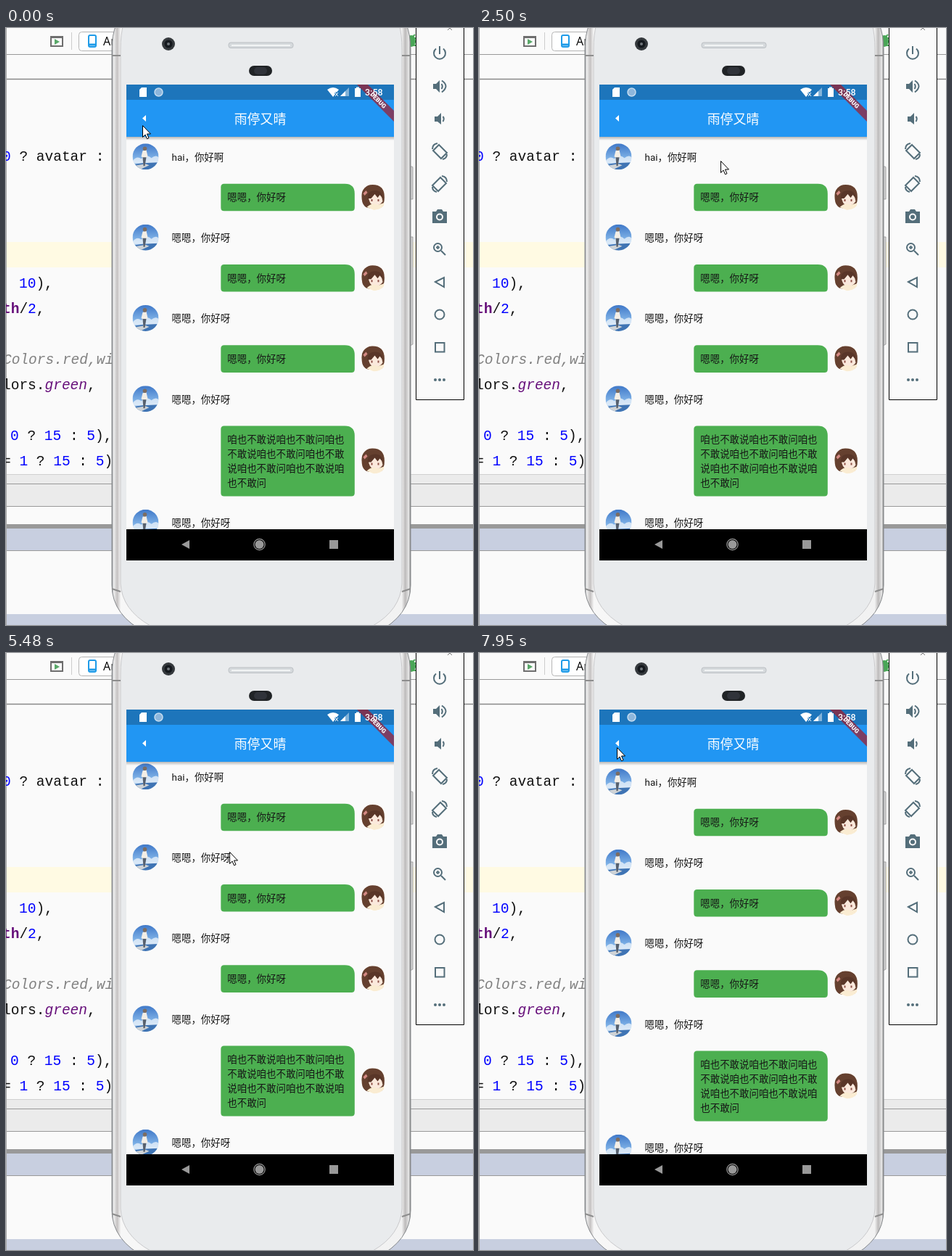
An HTML page that plays this animation: 644x823 px, repeating every 8 s.

```html
<!DOCTYPE html>
<html lang="zh-CN">
<head>
<meta charset="utf-8">
<title>Chat app demo</title>
<style>
html, body { margin: 0; width: 100%; height: 100%; overflow: hidden; background: #fafafa; }
svg { display: block; width: 644px; height: 823px; }
text { white-space: pre; }
.ui { font-family: Roboto, "Noto Sans CJK SC", "Noto Sans CJK", sans-serif; fill: #161616; }
.title { font-size: 17.9px; fill: #fff; text-anchor: middle; }
.msg { font-size: 13.45px; }
.code { font: 19.5px "Liberation Mono", monospace; fill: #111; }
.num { fill: #00f; }
.field { fill: #660e7a; }
.tool { fill: none; stroke: #546e7a; stroke-width: 2; }
.solid { fill: #546e7a; stroke: none; }

#chat { animation: fade 8s infinite, slide 8s infinite; }
#messages { animation: scroll 8s ease-in-out infinite; }
#glow-top { animation: glow-top 8s linear infinite; }
#glow-end { animation: glow-end 8s linear infinite; }
#cursor { animation: point 8s linear infinite; }

/* Page closes, opens at once, closes again and opens with a transition */
@keyframes fade {
  0%, 9.2% { opacity: 1; animation-timing-function: cubic-bezier(0, 0, .58, 1); }
  13.2% { opacity: 0; animation-timing-function: step-end; }
  31.25%, 86.6% { opacity: 1; animation-timing-function: cubic-bezier(0, 0, .58, 1); }
  90.6%, 94.9% { opacity: 0; animation-timing-function: cubic-bezier(.42, 0, 1, 1); }
  98%, 100% { opacity: 1; }
}
@keyframes slide {
  0%, 9.2% { transform: none; animation-timing-function: cubic-bezier(.8, 0, .6, 1); }
  13.2% { transform: translateY(153px); animation-timing-function: step-end; }
  31.25%, 86.6% { transform: none; animation-timing-function: cubic-bezier(.8, 0, .6, 1); }
  90.6%, 94.9% { transform: translateY(153px); animation-timing-function: cubic-bezier(.4, 0, .2, 1); }
  98%, 100% { transform: none; }
}
@keyframes scroll {
  0%, 39% { transform: none; }
  46%, 51% { transform: translateY(-94px); animation-timing-function: linear; }
  56.1%, 57.6% { transform: translateY(-12.5px); }
  59%, 66.5% { transform: none; }
  68.5%, 70% { transform: translateY(-7px); }
  74%, 78.2% { transform: translateY(-94px); }
  80%, 91% { transform: translateY(-90px); animation-timing-function: step-end; }
  92%, 100% { transform: none; }
}
@keyframes glow-end {
  0%, 48% { opacity: 0; }
  51% { opacity: .13; }
  56.1%, 57.6% { opacity: .075; }
  59%, 100% { opacity: 0; }
}
@keyframes glow-top {
  0%, 58% { opacity: 0; }
  60%, 62% { opacity: .1; }
  65%, 100% { opacity: 0; }
}
@keyframes point {
  0%, 1.87% { transform: translate(188px, 134px); }
  1.88%, 5.75% { transform: translate(183px, 130px); }
  9.1% { transform: translate(190px, 130px); }
  11%, 12.5% { transform: translate(210px, 128px); }
  17.75%, 35.8% { transform: translate(333px, 183px); }
  39% { transform: translate(345px, 400px); }
  46%, 51% { transform: translate(334px, 265px); }
  56.1%, 57.6% { transform: translate(336px, 352px); }
  60% { transform: translate(335px, 380px); }
  68.5%, 70% { transform: translate(308px, 274px); }
  76.3%, 78.2% { transform: translate(320px, 207px); }
  80%, 83.2% { transform: translate(322px, 212px); }
  86.6% { transform: translate(190px, 130px); }
  93%, 96.3% { transform: translate(300px, 172px); }
  97.9% { transform: translate(215px, 87px); }
  99.3%, 100% { transform: translate(190px, 130px); }
}
</style>
</head>
<body>
<svg viewBox="0 0 644 823">
  <defs>
    <linearGradient id="sky" x2="0" y2="1">
      <stop offset="0" stop-color="#3f78c8"/><stop offset=".55" stop-color="#7db0e6"/><stop offset="1" stop-color="#dbeaf6"/>
    </linearGradient>
    <linearGradient id="shade" x2="0" y2="1">
      <stop offset="0" stop-opacity=".27"/><stop offset="1" stop-opacity="0"/>
    </linearGradient>
    <linearGradient id="rim">
      <stop offset="0" stop-color="#85898d"/><stop offset=".006" stop-color="#eee"/><stop offset=".018" stop-color="#c5c2c2"/>
      <stop offset=".03" stop-color="#f7f7f7"/><stop offset=".97" stop-color="#f2f2f2"/><stop offset=".982" stop-color="#bdbbbb"/>
      <stop offset=".994" stop-color="#e6e6e6"/><stop offset="1" stop-color="#777"/>
    </linearGradient>
    <clipPath id="disc"><circle r="18"/></clipPath>
    <clipPath id="screen"><path d="M166 78H535V691H166z"/></clipPath>
    <clipPath id="body"><path d="M166 150H535V691H166z"/></clipPath>
    <g id="seaside">
      <path d="M-18-18H18V18H-18z" fill="url(#sky)"/>
      <path d="M-18 6Q-12-2-6 3Q2-4 8 2Q14-3 18 1V9H-18z" fill="#eef5fb" opacity=".75"/>
      <path d="M-18 11L-4 9L18 8V18H-18z" fill="#3f74b4"/>
      <path d="M-18 13L0 10L5 12L-8 18H-18z" fill="#cfd3d6"/>
      <path d="M-4-8L1-9L3 0L0 2L-1 12H-3L-3 2L-6 0z" fill="#f3eee6"/>
      <path d="M-4 1H1L-1 13H-3z" fill="#56606e"/>
      <circle cx="-1" cy="-11" r="2.8" fill="#7c6d62"/>
    </g>
    <g id="girl">
      <path d="M-18-18H18V18H-18z" fill="#fffdf9"/>
      <path d="M-16 8Q-21-17-2-17Q17-17 14 6L11 14Q-8 17-14 13z" fill="#65402f"/>
      <path d="M-8-2Q2-10 10-3L12 6Q7 13 0 12Q-7 10-8-2z" fill="#fbe9dc"/>
      <path d="M-9 2Q-9-10 3-9Q12-8 12 2L8-3L5 1L1-4L-4 2z" fill="#593628"/>
      <path d="M-10 14Q-2 7 5 11L14 8L13 16L0 18z" fill="#faecd2"/>
      <path d="M-15-5L-11-9L-9-6L-13-2z" fill="#d58a84"/>
      <path d="M-3 3V6M6 3V6" stroke="#8e5147" stroke-width="2"/>
    </g>
  </defs>

  <!-- editor window -->
  <path d="M0 0H644V823H0z" fill="#fafafa"/>
  <path d="M0 295H644V330H0z" fill="#fffae3"/>
  <path d="M0 615H644V659H0z" fill="#ebebeb"/>
  <path d="M0 684H644V690H0z" fill="#999"/>
  <path d="M0 690H644V720H0zM0 808H644V823H0z" fill="#c8cfe0"/>
  <path d="M0 36.5H644M0 628.5H644M0 659.5H644M0 720.5H644" stroke="#999"/>
  <path d="M0 70.5H644" stroke="#888" stroke-width="1.6"/>
  <path d="M0 615.5H644" stroke="#d0d0d0"/>
  <path d="M.5 0V823" stroke="#aaa"/>
  <path d="M62 12H78V25H62zM62 13H78" fill="none" stroke="#6e6e6e" stroke-width="2"/>
  <path d="M67 15L74 19L67 23z" fill="#59a869"/>
  <path d="M90.5 6V30" stroke="#ccc"/>
  <rect x="100.5" y="5.5" width="90" height="26" rx="4" fill="#fff" stroke="#b5b5b5"/>
  <rect x="114" y="10" width="10" height="16" rx="2" fill="#fff" stroke="#1e9be8" stroke-width="2"/>
  <path d="M114 23H124" stroke="#1e9be8" stroke-width="3"/>
  <text x="134" y="24" style="font:16px 'Open Sans',sans-serif">An</text>
  <g stroke="#4aa657" stroke-width="2"><ellipse cx="559" cy="18" rx="5" ry="7" fill="#4aa657"/><path d="M551 14H567M551 19H567M552 24H566M554 9L557 12M564 9L561 12"/></g>
  <g class="code">
    <text x="-5" y="183"><tspan class="num">0</tspan> ? avatar :</text>
    <text x="18" y="358"><tspan class="num">10</tspan>),</text>
    <text x="-5" y="393"><tspan class="field" font-weight="bold">th</tspan>/<tspan class="num">2</tspan>,</text>
    <text x="-4" y="463" font-style="italic" fill="#808080">Colors.red,wi</text>
    <text x="-5" y="498">lors.<tspan class="field" font-style="italic">green</tspan>,</text>
    <text x="6" y="568"><tspan class="num">0</tspan> ? <tspan class="num">15</tspan> : <tspan class="num">5</tspan>),</text>
    <text x="-5" y="603">= <tspan class="num">1</tspan> ? <tspan class="num">15</tspan> : <tspan class="num">5</tspan>)</text>
  </g>

  <!-- phone -->
  <path d="M557 191H560Q561 191 561 193V236H557zM557 288H561V436L557 438z" fill="#d5d5d5" stroke="#888" stroke-width=".7"/>
  <path d="M152-5Q146 10 146 30V768Q146 810 194 834H510Q558 810 558 768V30Q558 10 552-5z" fill="url(#rim)" stroke="#85888b"/>
  <path d="M162-5Q158 8 158 30V766Q160 802 199 824H506Q544 802 546 766V30Q546 8 542-5z" fill="#e9ebed" stroke="#c9c9cb"/>
  <path d="M146 38H158M546 38H558M146 773L158 777M546 777L558 773" stroke="#8d8d8d" stroke-width="2"/>
  <circle cx="224" cy="22" r="9" fill="#35393d"/><circle cx="224" cy="22" r="5.5" fill="#15191e"/><circle cx="224" cy="22" r="2" fill="#71777c"/>
  <rect x="307" y="20" width="89" height="7.5" rx="3" fill="#d5d9dc" stroke="#bcc0c4"/>
  <path d="M311 24H392" stroke="#f2f4f5" stroke-width="2"/>
  <rect x="335" y="52" width="32" height="14" rx="7" fill="#202326"/><rect x="342" y="54" width="18" height="10" rx="5" fill="#30333a"/>

  <g class="ui" clip-path="url(#screen)">
    <g id="rooms">
      <path d="M166 78H535V691H166z" fill="#fafafa"/>
      <use href="#seaside" transform="translate(192.5 179.5) scale(1.25)"/>
      <text x="228.5" y="177" font-size="16.1" font-weight="bold">雨停又晴</text>
      <text x="228.5" y="197" font-size="12.56" fill="#444">哈哈哈，我是你的聊天内容</text>
      <text x="530" y="175.5" font-size="12.56" fill="#444" text-anchor="end">17:45</text>
      <path d="M166 150H535V155H166z" fill="url(#shade)"/>
      <path d="M166 78H535V150H166z" fill="#2196f3"/>
      <text class="title" x="350.5" y="131.5">聊天室</text>
    </g>
    <g id="chat">
      <path d="M166 78H535V691H166z" fill="#fafafa"/>
      <g clip-path="url(#body)">
        <circle id="glow-top" cx="350" cy="-812" r="1000" fill="#2196f3"/>
        <circle id="glow-end" cx="350" cy="1653" r="1000" fill="#2196f3"/>
        <g id="messages"></g>
      </g>
      <path d="M166 150H535V155H166z" fill="url(#shade)"/>
      <path d="M166 78H535V150H166z" fill="#2196f3"/>
      <path d="M188 124.5L193 120V129z" fill="#fff"/>
      <text class="title" x="350.5" y="131.5">雨停又晴</text>
    </g>
    <path d="M166 78H535V99H166z" opacity=".25"/>
    <path d="M484 78H499L535 114V129z" fill="#a01d2d" opacity=".72"/>
    <text transform="translate(513.4 99.6) rotate(45)" y="3" font-size="8.5" font-weight="900" text-anchor="middle" fill="#fff">DEBUG</text>
    <g fill="#fff">
      <path d="M187 82H194V95H184V85z"/>
      <circle cx="210.5" cy="88.5" r="5.5" fill="#8db6dc" stroke="#c4dbef" stroke-width="1.5"/>
      <path d="M443 85Q451 79 459 85L451 95z"/>
      <path d="M454 89L459 94M459 89L454 94" stroke="#1971b6" stroke-width="3"/>
      <path d="M454 89L458 94M458 89L454 94" stroke="#fff"/>
      <path d="M461 94L473 82V94z" opacity=".45"/><path d="M461 94L468 87V94z"/>
      <path d="M481 83H483V81.5H487V83H489V95H481z"/>
      <text x="495" y="93" font-size="12.5" font-weight="500" fill="#fff">3:58</text>
    </g>
  </g>
  <path d="M166 691H535V734H166z"/>
  <g fill="#999"><path d="M242 712L253 706V718z"/><circle cx="349.5" cy="712" r="6"/><circle cx="349.5" cy="712" r="7.7" fill="none" stroke="#999" stroke-width="1.2"/><path d="M446 706H458V718H446z"/></g>

  <!-- emulator tools -->
  <path d="M565.5-2H631.5V512.5H565.5z" fill="#fafafa" stroke="#000"/>
  <path d="M609-3L615 3M615-3L609 3" stroke="#777"/>
  <g class="tool">
    <path d="M598 25V36M593 28.5A8 8 0 1 0 603 28.5"/>
    <path class="solid" d="M589 77H593L598 72V89L593 84H589zM591 122H595L600 117V133L595 129H591z"/>
    <path d="M600.5 77Q603 80.5 600.5 84M601 72.5Q612 80 601 88.5M602.5 122Q605 125 602.5 129"/>
    <path id="rotate" d="M597 161L608 172L600 180L589 169zM588 167Q588 160 595 159M608 174Q608 180 602 181"/>
    <use href="#rotate" transform="matrix(-1 0 0 1 1196 45)"/>
    <path class="solid" d="M588 253H593L595 250H601L603 253H608V269H588z"/><circle cx="598" cy="260.5" r="4" stroke="#fafafa"/>
    <circle cx="595.5" cy="302.5" r="5.5"/><path d="M600 307L606 313M593 302.5H598M595.5 300V305"/>
    <path d="M592 350L604 344V357z"/><circle cx="598" cy="395" r="6.5"/><path d="M592 434H604.5V446.5H592z"/>
    <g class="solid"><circle cx="592" cy="485" r="2"/><circle cx="598" cy="485" r="2"/><circle cx="604" cy="485" r="2"/></g>
  </g>
  <path id="cursor" d="M.5.5V16.5L4 13L6.5 18.8L9 17.7L6.5 12H11.5z" fill="#fff" stroke="#000"/>
</svg>
<script>
const reply = ["嗯嗯，你好呀"];
const complaint = ["咱也不敢说咱也不敢问咱也", "不敢说咱也不敢问咱也不敢", "说咱也不敢问咱也不敢说咱", "也不敢问"];
const dialogue = [["hai，你好啊"], ...Array(6).fill(reply), complaint, reply, ["哈哈哈 恭喜你也看到了我得", "消息"]];
const lineHeight = 19.75;

// Small corners, except the upper one on the sender's side
function bubblePath(x, y, width, height, mine) {
  const small = 4.5, big = 13.5;
  const [left, right] = mine ? [small, big] : [big, small];
  return `M${x + left} ${y} H${x + width - right} q${right} 0 ${right} ${right}
    V${y + height - small} q0 ${small} ${-small} ${small}
    H${x + small} q${-small} 0 ${-small} ${-small}
    V${y + left} q0 ${-left} ${left} ${-left} z`;
}

function message(lines, y, height, mine) {
  const x = mine ? 296.3 : 219.5;
  const texts = lines.map((line, i) =>
    `<text class="msg" x="${x + 9}" y="${y + 23.7 + i * lineHeight}">${line}</text>`);
  return `<path d="${bubblePath(x, y, 184.5, height, mine)}" fill="${mine ? "#4caf50" : "#fafafa"}"/>
    ${texts.join("")}
    <g transform="translate(${mine ? 507.5 : 192.5} ${y + height / 2 - 0.5})">
      <use href="#${mine ? "girl" : "seaside"}" clip-path="url(#disc)"/>
    </g>`;
}

let rowTop = 150;
document.getElementById("messages").innerHTML = dialogue.map((lines, i) => {
  const height = lines.length * lineHeight + 17.9;
  const y = rowTop + 9;
  rowTop += height + 18;
  return message(lines, y, height, i % 2 === 1);
}).join("");
</script>
</body>
</html>
```
